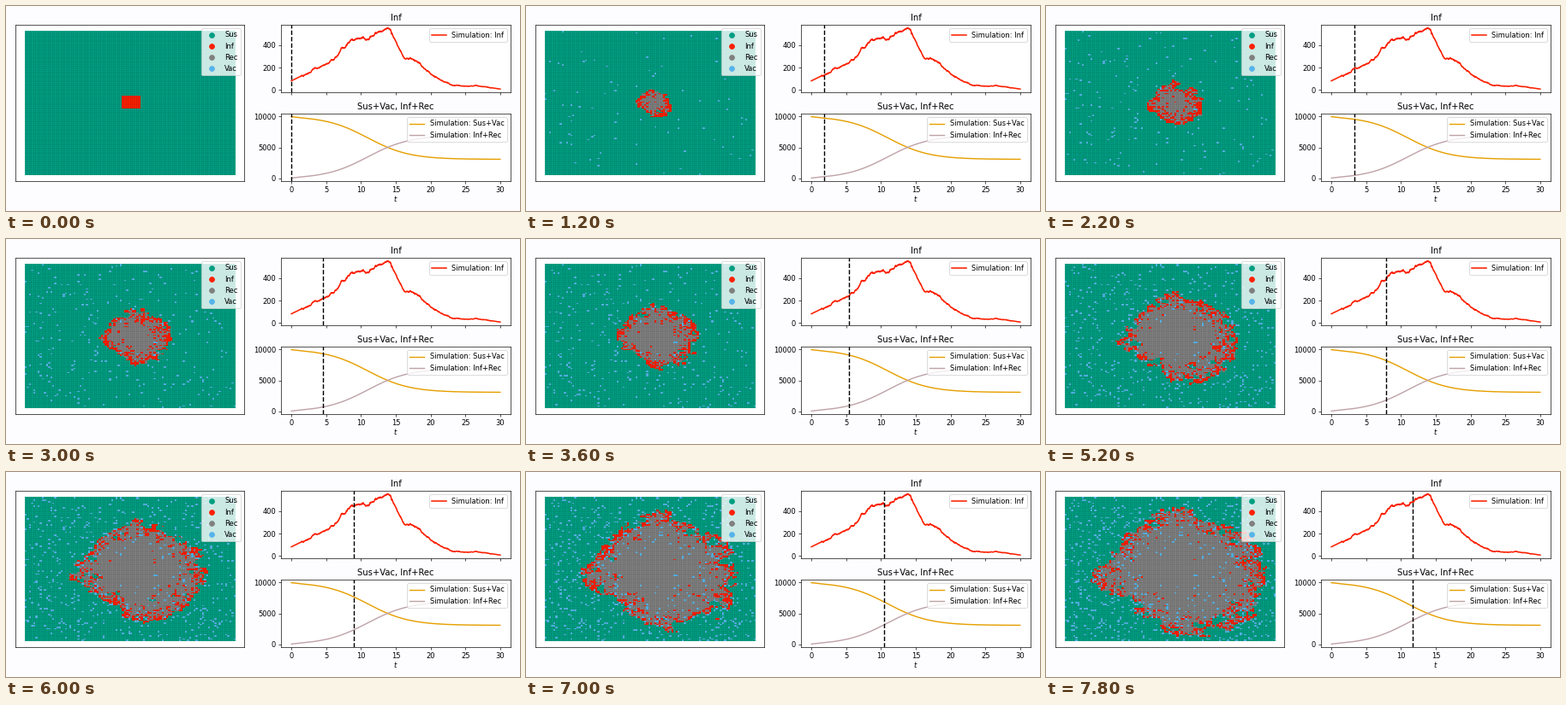
A matplotlib script for the animation above (8000 ms loop, 600 px wide and 240 px high).

```python
import numpy as np
import matplotlib.pyplot as plt
from matplotlib.animation import FuncAnimation
from matplotlib.colors import to_rgb

W, H, DPI = 600, 240, 60
N, FRAMES, STEP, INTERVAL = 100, 40, 0.3, 200
T_END = (FRAMES - 1) * STEP
CELL_W, CELL_H = 2.45, 1.68          # cell size in pixels
SUS, INF, REC, VAC = "#029e82", "#fa2000", "#808080", "#56b4e9"
ORANGE, MAUVE = "#e69f00", "#bfa3a8"
rng = np.random.default_rng(12)

# Last outline of the outbreak: degrees clockwise from east, radius in pixels
OUTLINE = [(0, 106), (23, 110), (73, 82), (110, 64), (148, 64), (173, 92),
           (200, 66), (238, 60), (284, 74), (318, 74), (338, 98)]
INF_KEYS = [(0, 81), (3.3, 180), (5.9, 262), (8.6, 455), (11, 460),
            (13.5, 548), (14.2, 540), (16.2, 285), (17.4, 278), (21, 100),
            (23.5, 35), (27, 35), (30, 7)]


def blobs(passes):
    """Unit-variance noise smoothed over neighbouring cells."""
    f = rng.normal(size=(N, N))
    for _ in range(passes):
        f = (f + sum(np.roll(f, s, a) for s in (1, -1) for a in (0, 1))) / 5
    return f / f.std()


def infection_times():
    """The outline grows steadily from a small block; noise delays cells."""
    row, col = np.mgrid[:N, :N]
    x, y = (col - 50) * CELL_W, (row - 49) * CELL_H
    angle = np.degrees(np.arctan2(y, x))
    reach = np.interp(angle, *zip(*OUTLINE), period=360)
    lag = 0.5 * blobs(3) ** 2 + 0.5 * blobs(15) ** 2
    share = np.hypot(x, y) / reach * (0.94 + 0.12 * lag)
    t = np.maximum(T_END * (share - 0.08) / 0.92, 0.05)
    block = (abs(col - 50) <= 4) & (abs(row - 49) <= 4)
    return np.where(block, 0, t)


def vaccination_times():
    """Invert the vaccinated share a*t^2 + b*t for a random level per cell."""
    a, b = 0.0002, 0.0055
    u = rng.random((N, N))
    return (-b + np.sqrt(b * b + 4 * a * u)) / (2 * a)


t_inf = infection_times()
t_rec = t_inf + rng.exponential(1.0, (N, N)) + 0.01
t_vac = vaccination_times()
PALETTE = np.array([to_rgb(c) for c in (SUS, INF, REC, VAC)])


def cells(t):
    state = np.where(t_inf <= t, 1, 0)
    state[t_rec <= t] = 2
    state[(t_vac <= t) & (t_vac < t_inf)] = 3
    return PALETTE[state]


def inf_curve(t):
    base = np.interp(t, *zip(*INF_KEYS))
    walk = np.cumsum(rng.normal(size=t.size))
    walk -= np.convolve(walk, np.ones(61) / 61, mode="same")
    walk[:40] = walk[-40:] = 0
    return np.maximum(base + 0.17 * np.sqrt(base) * walk, 5)


def ever_infected(t):
    return 6920 / (1 + np.exp((10.95 - t) / 3)) - 94 * np.exp(-t)


fig = plt.figure(figsize=(W / DPI, H / DPI), dpi=DPI, facecolor="#fdfcfe")


def panel(x0, y0, x1, y1):
    return fig.add_axes([x0 / W, 1 - y1 / H, (x1 - x0) / W, (y1 - y0) / H])


grid = panel(11, 22, 278, 205)
top = panel(321, 22, 589, 101)
low = panel(321, 126, 589, 205)

# Population grid
img = grid.imshow(cells(0), extent=(-0.5, 99.5, -0.5, 99.5), aspect="auto",
                  interpolation="nearest")
edges = np.arange(0.5, N - 1)
grid.vlines(edges, -0.5, 99.5, color="black", alpha=0.12, lw=0.7)
grid.hlines(edges, -0.5, 99.5, color="black", alpha=0.08, lw=0.7)
for name, color in zip(("Sus", "Inf", "Rec", "Vac"), (SUS, INF, REC, VAC)):
    grid.plot([], [], "o", ms=7, color=color, label=name)
grid.set(xlim=(-4.95, 103.95), ylim=(-4.95, 103.95), xticks=[], yticks=[])
grid.legend(loc="upper right")

# Curves
t = np.linspace(0, 30, 901)
total = ever_infected(t)
top.plot(t, inf_curve(t), color=INF, lw=1.9, label="Simulation: Inf")
top.set(title="Inf", ylim=(-22, 584), yticks=[0, 200, 400])
top.tick_params(labelbottom=False)
low.plot(t, N * N - total, color=ORANGE, lw=1.7, label="Simulation: Sus+Vac")
low.plot(t, total, color=MAUVE, lw=1.7, label="Simulation: Inf+Rec")
low.set(title="Sus+Vac, Inf+Rec", ylim=(-411, 10411),
        yticks=[0, 5000, 10000])
low.set_xlabel("$t$", labelpad=0)

cursors = []
for ax in (top, low):
    ax.set(xlim=(-1.5, 31.5), xticks=range(0, 31, 5))
    ax.legend(loc="upper right")
    cursors.append(ax.axvline(0, color="black", ls="--", lw=1.7))


def update(i):
    now = i * STEP
    img.set_data(cells(now))
    for line in cursors:
        line.set_xdata([now, now])
    return [img, *cursors]


anim = FuncAnimation(fig, update, frames=FRAMES, interval=INTERVAL,
                     repeat=True, repeat_delay=0, blit=False)
plt.show()
```
